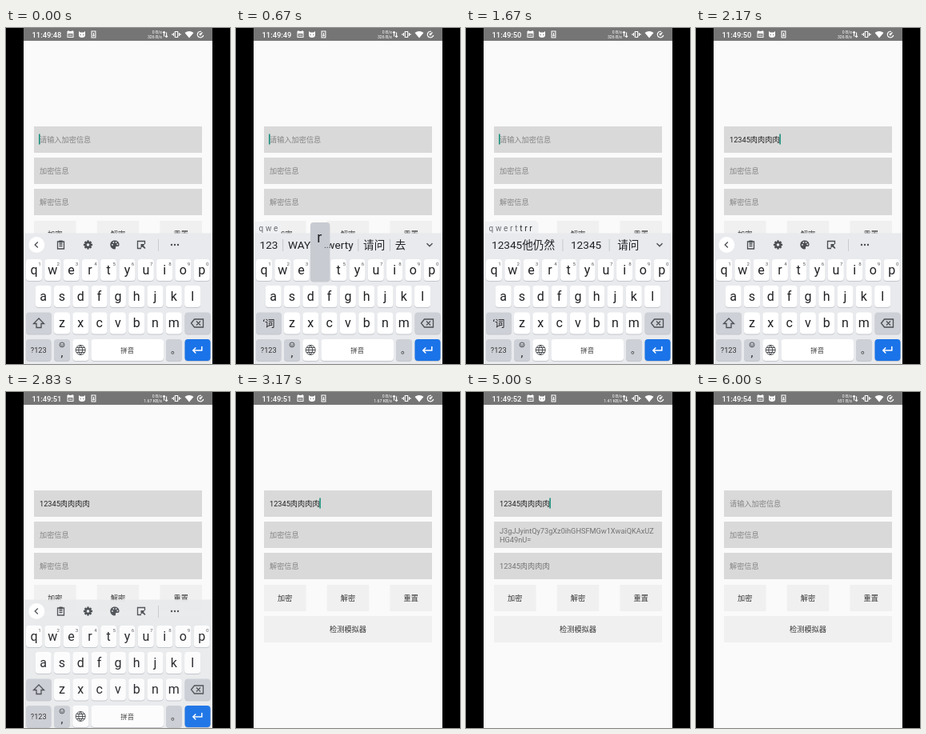
These frames come from a looping animation (280 by 420 pixels, 6170 ms). An HTML page with a canvas:

```html
<!DOCTYPE html>
<html lang="zh-CN">
<head>
<meta charset="utf-8">
<title>加密演示</title>
<style>
html, body { margin: 0; width: 100%; height: 100%; overflow: hidden; background: #000; }
canvas { display: block; width: 280px; height: 420px; }
</style>
</head>
<body>
<canvas id="stage"></canvas>
<script>
const LOOP = 6170, W = 280, H = 420;
const FONT = 'Roboto, "Noto Sans CJK SC", "Noto Sans CJK", sans-serif';
const PLAIN = '12345肉肉肉肉';
const CIPHER = ['J3gJJyintQy73gXz0ihGHSFMGw1XwaiQKAxUZ', 'HG49nU='];

// Each step changes only the listed parts of the state.
const steps = [
  [0, { sec: 48, speed: '326 B/s', caret: 1, kb: 0, alpha: 1, typed: '', press: '', words: null,
        gap: 14, plain: '', cipher: 0, result: '' }],
  [170, { press: 'q' }],
  [340, { typed: 'q', press: 'w', words: ['1', '去', '请', '前', '全'], gap: 22 }],
  [500, { typed: 'qw', press: 'e', words: ['12', '请问', '期望', '去'], gap: 20 }],
  [670, { sec: 49, typed: 'qwe', press: 'r', words: ['123', 'WAY', 'qwerty', '请问', '去'], gap: 12.5 }],
  [840, { typed: 'qwer', press: 't', words: ['1234', 'qwerty', '请问', '去'], gap: 17 }],
  [1000, { typed: 'qwert', press: '', words: ['12345', '慕栎川', 'qwerty', '请问'], gap: 14 }],
  [1170, { press: 't' }],
  [1330, { typed: 'qwertt', press: 'r', words: ['12345他', '12345', '请问'], gap: 20 }],
  [1500, { typed: 'qwerttr', words: ['12345他人', '12345', '请问'] }],
  [1670, { sec: 50, typed: 'qwerttrr', press: '', words: ['12345他仍然', '12345', '请问'] }],
  [1840, { press: 'r' }],
  [2000, { typed: 'qwerttrrr', press: '', words: [PLAIN, '12345', '请问'] }],
  [2170, { typed: '', words: null, plain: PLAIN }],
  [2500, { caret: 0 }],
  [2830, { sec: 51, speed: '1.67 KB/s', kb: 3, alpha: .95 }],
  [3000, { caret: 1, alpha: 0 }],
  [3500, { caret: 0 }],
  [3670, { cipher: 1 }],
  [4000, { caret: 1, sec: 52, speed: '1.41 KB/s' }],
  [4500, { caret: 0 }],
  [4670, { result: PLAIN }],
  [5000, { caret: 1 }],
  [5170, { sec: 53 }],
  [5500, { plain: '', cipher: 0, result: '' }],
  [6000, { caret: 0, sec: 54, speed: '651 B/s' }]
];

const canvas = document.getElementById('stage');
const ctx = canvas.getContext('2d');
const ratio = window.devicePixelRatio || 1;
canvas.width = W * ratio;
canvas.height = H * ratio;

function rect(x, y, w, h, color, r = 0) {
  ctx.fillStyle = color;
  ctx.beginPath();
  ctx.roundRect(x, y, w, h, r);
  ctx.fill();
}

function text(s, x, y, size, color, align = 'left', weight = 400) {
  ctx.font = `${weight} ${size}px ${FONT}`;
  ctx.fillStyle = color;
  ctx.textAlign = align;
  ctx.fillText(s, x, y);
}

function line(d, color, width = 1, x = 0, y = 0) {
  ctx.save();
  ctx.translate(x, y);
  ctx.strokeStyle = color;
  ctx.lineWidth = width;
  ctx.stroke(new Path2D(d));
  ctx.restore();
}

function shape(d, color, x = 0, y = 0) {
  ctx.save();
  ctx.translate(x, y);
  ctx.fillStyle = color;
  ctx.fill(new Path2D(d), 'evenodd');
  ctx.restore();
}

function dot(x, y, r, color) {
  ctx.fillStyle = color;
  ctx.beginPath();
  ctx.arc(x, y, r, 0, 7);
  ctx.fill();
}

function statusBar(s) {
  rect(22, 0, 236, 16, '#757575');
  text('11:49:' + s.sec, 32.5, 11.5, 9.4, '#fff', 'left', 500);
  // calendar, cat, phone
  shape('M-4-4H4V4H-4ZM-3-1V3H3V-1Z', '#fff', 80.5, 8);
  line('M-2 1H2M-2.5-5V-3M2.5-5V-3', '#fff', 1, 80.5, 8);
  shape('M-4-4L-2-2.6H2L4-4V1Q4 4 0 4T-4 1Z', '#fff', 95, 8);
  dot(93.2, 8.5, .7, '#757575');
  dot(96.8, 8.5, .7, '#757575');
  line('M-2.4-4H2.4V4H-2.4ZM0-2V2M-1 1L0 2L1 1', '#fff', 1.1, 109.5, 8);
  text('0 B/s', 195, 6.8, 5.2, '#fff', 'right');
  text(s.speed, 195, 13.3, 5.2, '#fff', 'right');
  // traffic, vibrate, wifi, battery
  line('M-1.4 3V-3M-3-1.5L-1.4-3L0-1.5M1.6-2V4M0 2.5L1.6 4L3 2.5', '#fff', 1.1, 199, 7.5);
  line('M-1.7-3.5H1.7V3.5H-1.7ZM-3.5-2V2M3.5-2V2M-5-1V1M5-1V1', '#fff', 1.1, 213, 8);
  shape('M0 4.5L-5.5-2Q0-6 5.5-2Z', '#fff', 229, 8);
  line('M1-3.6A3.8 3.8 0 1 0 3.8 1M0 0L2.5-2.5', '#fff', 1.2, 243, 8);
  dot(243, 8, 1.4, '#fff');
}

function field(y, value, hint, color) {
  rect(35, y, 210, 33, '#d9d9d9');
  if (value) text(value, 42, y + 19.5, 9.2, color);
  else text(hint, 42, y + 19.5, 9.2, '#858585', 'left', 300);
}

function button(x, y, w, label) {
  rect(x, y, w, 33, '#f0f0f0');
  text(label, x + w / 2, y + 20, 9.2, '#333', 'center', 300);
}

function form(s) {
  rect(22, 16, 236, 404, '#fafafa');
  field(123, s.plain, '请输入加密信息', '#222');
  field(162, '', s.cipher ? '' : '加密信息');
  if (s.cipher) CIPHER.forEach((row, i) => text(row, 42, 177 + i * 10.5, 9.2, '#727272'));
  field(201, s.result, '解密信息', '#727272');
  if (s.caret) rect(s.plain ? 104.3 : 41, 132.5, 1.6, 13, '#178f7c');
  ['加密', '解密', '重置'].forEach((label, i) => button(35 + i * 78.7, 241, 52.6, label));
  button(35, 280, 210, '检测模拟器');
}

function key(x, y, w, color = '#fff') {
  rect(x, y + 1, w, 27, '#c3c6cb', 4);
  rect(x, y, w, 27, color, 4);
}

const rows = [['qwertyuiop', 35, 289], ['asdfghjkl', 46.7, 322], ['zxcvbnm', 70, 355.5]];
const PITCH = 23.3, GRAY = '#cdd0d6', INK = '#4b4e52';

function toolbar() {
  dot(38.3, 271, 10, '#fff');
  line('M1.8-3.5L-1.8 0L1.8 3.5', INK, 1.3, 38, 271);
  line('M-4-4H4V5H-4ZM-2-1H2M-2 1.5H2', INK, 1.3, 68.5, 271);
  rect(66.3, 265.5, 4.4, 3, INK);
  for (let i = 0; i < 8; i++) {
    const a = i * Math.PI / 4, c = Math.cos(a), n = Math.sin(a);
    line(`M${3 * c} ${3 * n}L${5.6 * c} ${5.6 * n}`, INK, 2.4, 102.5, 271);
  }
  shape('M-4.2 0A4.2 4.2 0 1 0 4.2 0A4.2 4.2 0 1 0-4.2 0M-1.8 0A1.8 1.8 0 1 0 1.8 0A1.8 1.8 0 1 0-1.8 0', INK, 102.5, 271);
  shape('M0-5.5C-8-5.5-7 5.5 0 5.5C2 5.5 0 2 2 2H4C7 2 6-5.5 0-5.5Z', INK, 136, 271);
  [[-3, 0], [-1.6, -3], [1.6, -3], [3.3, -.5]].forEach(([x, y]) => dot(136 + x, 271 + y, .9, '#e8eaed'));
  line('M4.5-1V-4.5H-4.5V4.5H0', INK, 1.3, 169, 271);
  shape('M-1-1H4L2.5 1L5 4L4 5L1 2.5L-1 4Z', INK, 169.5, 271);
  line('M190.5 264V279', '#c9ccd0');
  [207, 211, 215].forEach(x => dot(x, 271, 1.2, INK));
}

function suggestions(s) {
  let x = s.words.length === 3 ? 32 : 29.5;
  s.words.forEach((word, i) => {
    if (i) line(`M${x - s.gap / 2} 264V279`, '#c4c7cc');
    text(word, x, 276, 13.6, '#202124');
    x += ctx.measureText(word).width + s.gap;
  });
  line('M-3.5-1.7L0 1.7L3.5-1.7', INK, 1.4, 242, 271);
}

function composing(typed) {
  let x = 28.5;
  rect(22, 242, 14 + typed.length * 6.8, 15, '#f0f1f3', [0, 3, 0, 0]);
  [...typed].forEach((c, i) => {
    text(c, x, 253.5, 10, i < 5 ? '#686b70' : '#202124');
    x += ctx.measureText(c).width + 2.7;
  });
}

function bottomRow() {
  const y = 389;
  key(25, y, 31.5, GRAY);
  text('?123', 40.7, 405.5, 9.2, '#333', 'center');
  key(60, y, 20, GRAY);
  line('M-3 0A3 3 0 1 0 3 0A3 3 0 1 0-3 0M-1.5 .7Q0 2.2 1.5 .7', INK, .9, 70, 396);
  dot(68.9, 395.3, .5, INK);
  dot(71.1, 395.3, .5, INK);
  text(',', 70, 410, 13, '#333', 'center', 500);
  key(83.3, y, 20);
  line('M-6 0A6 6 0 1 0 6 0A6 6 0 1 0-6 0M-6 0H6M-5-3H5M-5 3H5M0-6Q-5 0 0 6Q5 0 0-6', INK, 1, 93.2, 402.5);
  key(106.5, y, 90.5);
  text('拼音', 151.7, 405.5, 8.4, '#333', 'center');
  key(200, y, 20, GRAY);
  text('。', 206, 407, 12, '#333');
  key(223.5, y, 32, '#1a73e8');
  line('M5.5-4V1H-5M-2-2.5L-5.5 1L-2 4.5', '#fff', 1.5, 239.3, 402);
}

function keyboard(s) {
  ctx.save();
  ctx.globalAlpha = s.alpha;
  ctx.translate(0, s.kb);
  if (s.typed) composing(s.typed);
  rect(22, 256.5, 236, 164, '#e8eaed');
  if (s.words) suggestions(s);
  else toolbar();
  rows.forEach(([letters, x0, y], r) => [...letters].forEach((c, i) => {
    const x = x0 + i * PITCH;
    key(x - 10, y, 20);
    text(c, x, y + 18.5, 16, '#202124', 'center');
    if (!r) text((i + 1) % 10, x + 7, y + 8, 6.2, '#55585d', 'center');
  }));
  key(25, 355.5, 32, GRAY);
  if (s.words) text('‘词', 41, 373.8, 12.5, '#202124', 'center');
  else line('M0-6L-6.5 .5H-3V5.5H3V.5H6.5Z', INK, 1.3, 41, 369);
  key(223.5, 355.5, 32, GRAY);
  line('M-8 0L-4-5H7V5H-4ZM-1.5-2.5L3.5 2.5M3.5-2.5L-1.5 2.5', INK, 1.3, 239.5, 369);
  bottomRow();
  if (s.press) {
    const x = rows[0][1] + rows[0][0].indexOf(s.press) * PITCH;
    rect(x - 12, 243, 24.5, 74.5, '#c8cbd1', 4);
    text(s.press, x - .5, 268, 18, '#202124', 'center');
    if (s.press === 'r' && s.typed === 'qwe') text('...', x + 5, 275, 11, '#444');
  }
  ctx.restore();
}

function draw(t) {
  const state = Object.assign({}, ...steps.filter(([at]) => at <= t).map(([, part]) => part));
  ctx.setTransform(ratio, 0, 0, ratio, 0, 0);
  rect(0, 0, W, H, '#000');
  ctx.save();
  ctx.beginPath();
  ctx.rect(22, 0, 236, H);
  ctx.clip();
  form(state);
  statusBar(state);
  if (state.alpha) keyboard(state);
  ctx.restore();
}

const start = performance.now();
function tick() {
  draw((performance.now() - start) % LOOP);
  requestAnimationFrame(tick);
}
tick();
</script>
</body>
</html>
```
